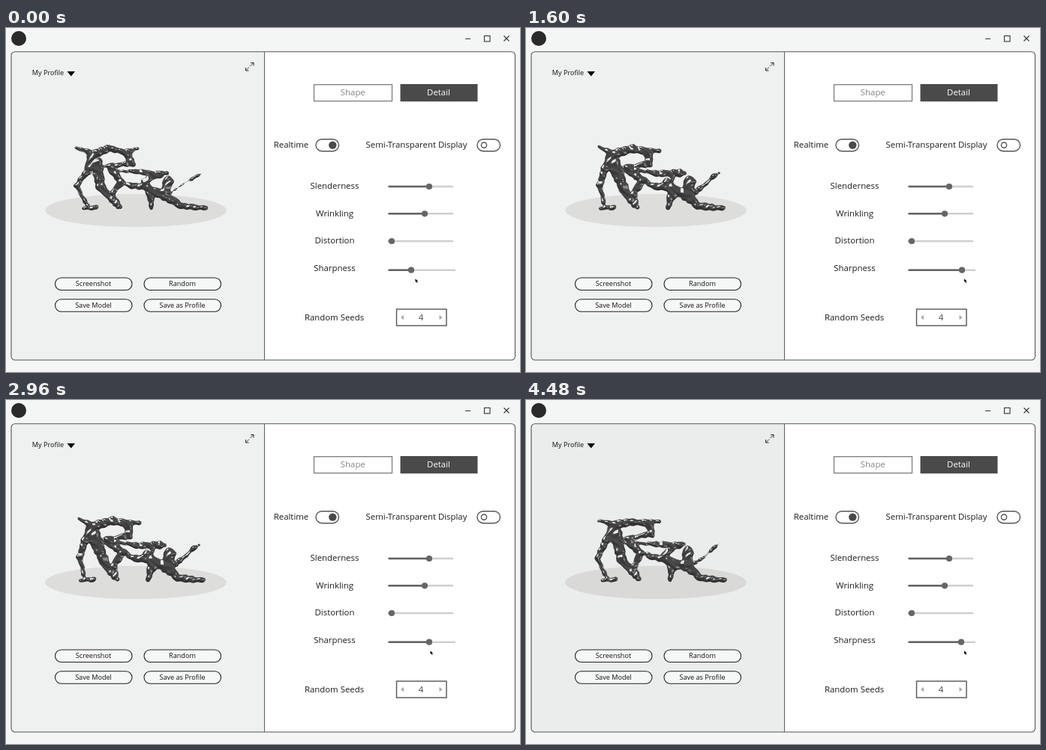
These frames come from a looping animation (685x460 px, 4.52 s). An HTML page with a canvas:

```html
<!DOCTYPE html>
<html lang="en">
<head>
<meta charset="utf-8">
<title>Shape generator</title>
<style>
  html, body { margin: 0; width: 685px; height: 460px; overflow: hidden; background: #f4f6f5; }
  svg, canvas { position: absolute; left: 0; top: 0; }
  canvas { left: 78px; top: 146px; }
  text { font: 11.4px "Open Sans", "Noto Sans", sans-serif; fill: #1c1c1c; text-anchor: middle; }
  .small { font-size: 9.1px; fill: #111; }
  .line { fill: none; stroke: #555; stroke-width: 1.4; }
</style>
</head>
<body>
<svg id="ui" width="685" height="460">
  <circle cx="17" cy="14" r="10" fill="#2a2a2a"/>
  <g fill="none" stroke="#333" stroke-width="1.1">
    <path d="M612 14.5h7M663.5 10.5l7 7m0-7l-7 7"/>
    <rect x="637.5" y="10.5" width="7.5" height="7.5"/>
  </g>
  <rect x="7" y="32" width="671" height="412" rx="5" fill="#fff"/>
  <path id="panel" d="M344 32H12q-5 0-5 5V439q0 5 5 5H344z"/>
  <ellipse id="floor" cx="173" cy="244" rx="121" ry="22.3"/>
  <rect class="line" x="7" y="31.7" width="671.5" height="412.3" rx="5" style="stroke-width:1.1"/>
  <path d="M344.5 32V444" stroke="#666" stroke-width="1.1"/>
  <text class="small" x="56" y="63.3">My Profile</text>
  <path d="M81.5 58h10.5l-5.2 6.5z"/>
  <path d="M326 46.5h4v4m0-4l-4.5 4.5M319.5 53v4h4m-4 0l4.5-4.5" fill="none" stroke="#333"/>

  <rect x="410.5" y="75.7" width="104" height="22" fill="#fff" stroke="#7d7d7d" stroke-width="1.3"/>
  <text x="462.3" y="90.2" style="fill:#858585">Shape</text>
  <rect x="525.5" y="75" width="103" height="23.3" fill="#4a4a4a"/>
  <text x="576.5" y="90.2" style="fill:#fff">Detail</text>

  <text x="380" y="160.3">Realtime</text>
  <rect class="line" x="413" y="148.7" width="30.5" height="16" rx="8"/>
  <circle cx="435.3" cy="156.6" r="5.2" fill="#4a4a4a"/>
  <text x="547" y="160.3">Semi-Transparent Display</text>
  <rect class="line" x="628" y="148.7" width="30.5" height="16" rx="8"/>
  <circle class="line" cx="637" cy="156.6" r="3.6"/>

  <text x="437.5" y="390.7">Random Seeds</text>
  <rect class="line" x="520.5" y="376" width="66.5" height="22"/>
  <text x="553" y="390.7" style="fill:#444">4</text>
  <path d="M530 383.8v6.4l-4-3.2zM577.5 383.8v6.4l4-3.2z" fill="#aaa"/>
  <path id="cursor" d="M0 0v4.5l1-1 1 2h1l-.7-2h1.3z"/>
</svg>
<canvas id="model" width="200" height="104"></canvas>

<script>
const LOOP = 4520, STEP = 40, W = 200, H = 104, LEFT = 78, TOP = 146;
const $ = id => document.getElementById(id);
const ui = $('ui'), ctx = $('model').getContext('2d');

function add(tag, attrs, text) {
  const el = document.createElementNS('http://www.w3.org/2000/svg', tag);
  for (const k in attrs) el.setAttribute(k, attrs[k]);
  if (text) el.textContent = text;
  return ui.insertBefore(el, $('cursor'));
}

function button(label, x, y) {
  add('rect', { x, y, width: 102.5, height: 16.5, rx: 8.2, fill: '#f6f7f7', stroke: '#222', 'stroke-width': 1.1 });
  add('text', { class: 'small', x: x + 51, y: y + 11.4 }, label);
}
button('Screenshot', 65.5, 334);
button('Random', 184, 334);
button('Save Model', 65.5, 362.7);
button('Save as Profile', 184, 362.7);

function slider(label, y, value, end = 595) {
  const bar = (x, stroke) => add('path', { d: `M510.5 ${y}H${x}`, stroke, 'stroke-width': 2.4, 'stroke-linecap': 'round' });
  bar(end, '#cfcfcf');
  const fill = bar(value, '#636363');
  const knob = add('circle', { cx: value, cy: y, r: 4.1, fill: '#666' });
  return x => {
    fill.setAttribute('d', `M510.5 ${y}H${x}`);
    knob.setAttribute('cx', x);
  };
}
slider('Slenderness', 212, 564);
slider('Wrinkling', 248.3, 558);
slider('Distortion', 285, 514);
const setSharpness = slider('Sharpness', 323.7, 540, 598);
['Slenderness', 'Wrinkling', 'Distortion', 'Sharpness'].forEach((label, i) =>
  add('text', { x: 438, y: 215.3 + 36.5 * i }, label));

// Limbs: radius, then the joints; each limb thins toward its last joint.
const LIMBS = `5 117,168 96,160
  6.5 116,169 139,162 160,165 176,163
  6 163,168 166,181 128,186
  6 113,172 107,190 96,211 107,238
  9 119,180 128,213 147,238
  4 118,240 101,241
  6 138,188 154,205 143,222 151,240
  5 205,195 176,193 148,191
  6 190,213 170,211 156,205
  7.5 214,221 195,219 186,207 198,195 212,193
  7 195,219 191,241
  8 217,205 212,223 232,238 265,241`.split('\n').map(row => {
  const [radius, ...joints] = row.trim().split(' ');
  return { radius: +radius, joints: joints.map(j => j.split(',').map(Number)) };
});
const HORN = { radius: 5, joints: [[219, 222], [238, 209], [250, 198]] };
const SHARD = { radius: 3, joints: [[248, 201], [258, 194]] };

const mix = (a, b, u) => a + (b - a) * u;

// Higher poses are fuller, drift to the left and grow a horn.
function segments(pose) {
  const grow = .9 + .07 * pose + (pose > 2 ? .14 : 0);
  const limbs = [...LIMBS, { ...HORN, radius: HORN.radius * (.1 + .32 * pose) }, SHARD];
  return limbs.flatMap(({ radius, joints }) => {
    const pts = joints.map(([x, y], i) => [
      x + 2.2 * Math.sin(y * .11 + pose * 1.7) - (pose > 2 ? 3 : 0),
      y + 1.6 * Math.sin(x * .13 + pose * 2.1) * (y < 232),
      radius * grow * mix(1, .4, i / (joints.length - 1))
    ]);
    return pts.slice(1).map((b, i) => [pts[i], b]);
  });
}

// Smooth union of tapered capsules, positive inside.
function buildField(pose) {
  const segs = segments(pose), field = new Float32Array(W * H);
  for (let i = 0; i < W * H; i++) {
    const x = LEFT + i % W + .5, y = TOP + Math.floor(i / W) + .5;
    let sum = 0;
    for (const [a, b] of segs) {
      const dx = b[0] - a[0], dy = b[1] - a[1];
      const u = Math.max(0, Math.min(1, ((x - a[0]) * dx + (y - a[1]) * dy) / (dx * dx + dy * dy)));
      const d = Math.hypot(x - a[0] - u * dx, y - a[1] - u * dy);
      const r = mix(a[2], b[2], u);
      sum += Math.exp(1.3 * (d < r ? (r * r - d * d) / (2 * r) : r - d));
    }
    field[i] = Math.max(-4, Math.log(sum + 1e-9) / 1.3);
  }
  return field;
}
const fields = [0, 1, 2, 3].map(buildField);

const smooth = (a, b, x) => {
  const u = Math.max(0, Math.min(1, (x - a) / (b - a)));
  return u * u * (3 - 2 * u);
};
const ripple = (x, y, p) =>
  Math.sin(x * .36 + 2 * Math.sin(y * .21) + p * .6) * Math.sin(y * .33 + 1.6 * Math.sin(x * .19) - p * .5);

const image = ctx.createImageData(W, H);
const body = new Float32Array(W * H), height = new Float32Array(W * H);

function drawModel(p) {
  const k = Math.min(2, Math.floor(p)), from = fields[k], to = fields[k + 1];
  for (let i = 0; i < W * H; i++) {
    const wave = ripple(i % W, Math.floor(i / W), p);
    body[i] = mix(from[i], to[i], p - k) + wave * .9;
    height[i] = Math.sqrt(Math.max(0, body[i] + .3) * 15) + wave * 1.1;
  }
  image.data.fill(0);
  for (let y = 1; y < H - 1; y++) {
    for (let x = 1; x < W - 1; x++) {
      const i = y * W + x;
      if (body[i] < -.5) continue;
      const gx = (height[i - 1] - height[i + 1]) / 2;
      const gy = (height[i - W] - height[i + W]) / 2;
      const len = Math.hypot(gx, gy, 1), nx = gx / len, ny = gy / len, nz = 1 / len;
      const key = smooth(.91, .99, -.38 * nx - .58 * ny + .72 * nz);
      const rim = smooth(.94, .995, .62 * nx + .15 * ny + .77 * nz);
      const o = i * 4;
      image.data.fill(46 + 26 * nz - 16 * ny + 160 * key + 75 * rim, o, o + 3);
      image.data[o + 3] = 255 * Math.min(1, body[i] + .5);
    }
  }
  ctx.putImageData(image, 0, 0);
}

// time, sharpness knob, pointer offset, pose
const KEYS = [
  [0, 540, 5.5, 0],
  [960, 571, 2.5, 1],
  [1600, 581, 3, 2],
  [1920, 581, 3, 2],
  [2240, 583, 5, 3],
  [2320, 583, 5, 3],
  [2960, 564, 1.5, 2],
  [3480, 557, 5.5, 1.3],
  [3760, 551, 5, 1],
  [4120, 567, 4, .65],
  [4480, 580, 4, .85]
];

function stateAt(t) {
  const n = KEYS.findIndex(k => k[0] > t);
  if (n < 0) return KEYS[KEYS.length - 1];
  const a = KEYS[n - 1], b = KEYS[n];
  return a.map((v, i) => mix(v, b[i], (t - a[0]) / (b[0] - a[0])));
}

let shown = -1;
function frame() {
  const t = Math.floor(performance.now() % LOOP / STEP) * STEP;
  if (t !== shown) {
    shown = t;
    const [, knob, offset, pose] = stateAt(t);
    setSharpness(knob);
    $('cursor').setAttribute('transform', `translate(${knob + offset} 335.3)`);
    $('panel').setAttribute('fill', t >= 4160 ? '#ebecec' : '#eff0f0');
    $('floor').setAttribute('fill', t >= 4160 ? '#d9d9d8' : '#dddddc');
    drawModel(pose);
  }
  requestAnimationFrame(frame);
}
frame();
</script>
</body>
</html>
```
